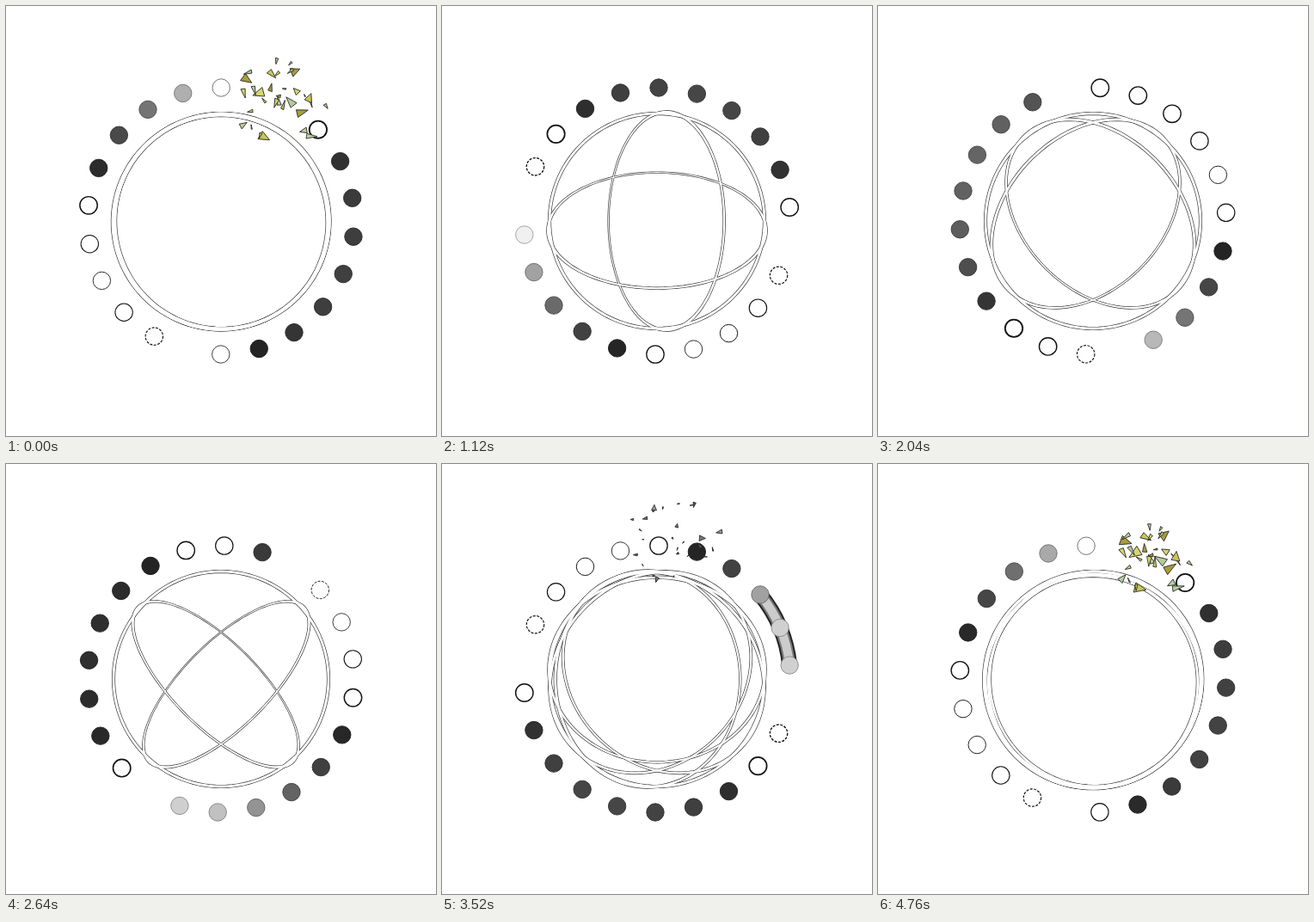
Write an HTML page with a canvas that moves like this. It is 500 by 500 pixels and loops after 4800 ms.

```html
<!DOCTYPE html>
<html lang="en">
<head>
<meta charset="utf-8">
<title>Beads and rings</title>
<style>
  html, body { margin: 0; height: 100%; overflow: hidden; background: #fff; }
  canvas { display: block; }
</style>
</head>
<body>
<canvas id="stage" width="500" height="500"></canvas>
<script>
const ctx = document.getElementById('stage').getContext('2d');
const LOOP = 4800, CENTER = 250, ORBIT = 155, RAD = Math.PI / 180;
const WAVE = 2400, FOCUS = 658, BURST = 580;
const mod = (a, n) => ((a % n) + n) % n;
const clamp = (v, lo, hi) => Math.min(hi, Math.max(lo, v));
const gray = v => `rgb(${[v, v, v].map(x => Math.round(x * 255))})`;

function stroke(color, width) {
  ctx.strokeStyle = color;
  ctx.lineWidth = width;
  ctx.stroke();
}

// Two groups of ten beads share one slow clockwise turn.
const beadAngle = (group, i, t) => (-90 - group * 180 - i * 150 / 9 + t * 360 / LOOP) * RAD;

function beadPath(group, i, t, r) {
  const a = beadAngle(group, i, t);
  ctx.beginPath();
  ctx.arc(CENTER + ORBIT * Math.cos(a), CENTER + ORBIT * Math.sin(a), r, 0, 7);
}

// A fading triangle wave runs along each group; dim beads show as outlines.
function drawBead(group, i, t) {
  const phase = mod(t + (group ? 0 : WAVE / 2) - 180 * i, WAVE) / WAVE;
  let level = 0.78 ** i * (1 - Math.abs(2 * phase - 1));
  const [tail, head] = smokeSpan(t);
  if (group && head > tail && i >= tail && i <= head) level = Math.min(0.8, level + 0.22);
  const filled = level > 0.115 && level < 0.95, shade = level ** 0.92;
  beadPath(group, i, t, 10.2);
  ctx.fillStyle = filled ? gray(shade) : '#fff';
  ctx.fill();
  if (filled) return stroke(gray(shade * 0.65), 0.9);
  if (level > 0.9) return stroke('#666', 0.9);
  if (i === 9 && level < 0.065) ctx.setLineDash([3, 1.5]);
  stroke('#111', 0.8 + level * 9);
  ctx.setLineDash([]);
}

// A circle tilted about an axis through its centre, seen in perspective.
function addCircle(radius, axis, tilt) {
  const c = Math.cos(axis), s = Math.sin(axis);
  for (let d = 0; d < 360; d += 3) {
    const across = radius * Math.cos(d * RAD), along = radius * Math.sin(d * RAD);
    const zoom = FOCUS / (FOCUS - across * Math.sin(tilt));
    const u = across * Math.cos(tilt) * zoom, v = along * zoom;
    const x = CENTER + u * c - v * s, y = CENTER + u * s + v * c;
    d ? ctx.lineTo(x, y) : ctx.moveTo(x, y);
  }
  ctx.closePath();
}

// Dark bands first, then white insides, so overlapping bands merge.
function drawRings(t) {
  const spin = mod(Math.floor((t - 40) / 1600), 3);
  const tilt = -(t - 40) * 0.1125 * RAD;
  const rings = [[0, 0]];
  for (let k = 0; k < 4; k++) {
    if (spin === 2 || k % 2 === spin) rings.push([k * 45 * RAD, tilt]);
  }
  for (const color of ['#333', '#fff']) {
    for (const [axis, angle] of rings) {
      ctx.beginPath();
      addCircle(123.6, axis, angle);
      addCircle(126.4, axis, angle);
      ctx.fillStyle = color;
      ctx.fill('evenodd');
      if (color !== '#fff') stroke(color, 1.3);
    }
  }
}

function drawRibbon(group, tail, head, t, layers) {
  if (head <= tail) return;
  ctx.lineCap = 'round';
  for (const [color, width] of layers) {
    ctx.beginPath();
    ctx.arc(CENTER, CENTER, ORBIT, beadAngle(group, tail, t), beadAngle(group, head, t), true);
    stroke(color, width);
  }
  ctx.lineCap = 'butt';
}

const smokeSpan = t => [clamp((t - 3560) / 80, 0, 4), clamp((t - 3360) / 80, 0, 4)];

function drawSmoke(t) {
  drawRibbon(1, ...smokeSpan(t), t, [['#222', 18], ['#777', 14], ['#ccc', 10]]);
}

function drawFire(t) {
  const shift = (t - 4160) / 50;
  const tail = clamp(1.5 + shift, 0, 9), head = clamp(5.5 + shift, 0, 9);
  if (head <= tail) return;
  drawRibbon(0, tail, head, t, [['#20250f', 18], ['#665a24', 13], ['#f5bd62', 10]]);
  for (let i = Math.ceil(tail); i <= head; i++) {
    beadPath(0, i, t, 9);
    stroke('rgba(110,90,30,.5)', 1);
  }
  ctx.beginPath();
  ctx.arc(CENTER, CENTER, 125, beadAngle(0, tail - 0.8, t), beadAngle(0, head + 0.6, t), true);
  stroke('#ff8a1c', 2.4);
}

function seeded(seed) {
  return () => (seed = (seed * 16807) % 2147483647) / 2147483647;
}

function drawBurst(age, x, y, reach, count, size, colors, seed) {
  const u = age / BURST;
  if (u < 0 || u >= 1) return;
  const rnd = seeded(seed), spread = reach * (1 - (1 - u) ** 2);
  for (let n = 0; n < count; n++) {
    const a = (n + rnd()) * 2.4, d = spread * rnd() ** 0.7;
    const r = size * (0.3 + rnd()) * (1 - u), flat = 0.1 + 0.9 * rnd();
    ctx.save();
    ctx.translate(x + d * Math.cos(a), y + d * Math.sin(a));
    ctx.rotate(rnd() * 6 + u * 4);
    ctx.beginPath();
    ctx.moveTo(r, 0);
    ctx.lineTo(-r * 0.6, r * 0.7 * flat);
    ctx.lineTo(-r * 0.5, -r * 0.8 * flat);
    ctx.closePath();
    ctx.fillStyle = colors[n % colors.length];
    ctx.fill();
    stroke('#222', 0.8);
    ctx.restore();
  }
}

function draw(t) {
  ctx.fillStyle = '#fff';
  ctx.fillRect(0, 0, 500, 500);
  drawRings(t);
  drawSmoke(t);
  const shatter = mod(t - 4620, LOOP);
  for (let i = 0; i < 10; i++) {
    drawBead(0, i, t);
    if (i < 9 || shatter > BURST) drawBead(1, i, t);
  }
  drawFire(t);
  drawBurst(t - 3200, 267, 91, 72, 26, 8, ['#555', '#777', '#999'], 77);
  drawBurst(shatter, 320, 112, 100, 32, 10, ['#b5cc9c', '#c9c658', '#a99c3a', '#b9cf9f', '#d5d76a'], 4242);
}

function tick(now) {
  draw(now % LOOP);
  requestAnimationFrame(tick);
}
requestAnimationFrame(tick);
</script>
</body>
</html>
```
